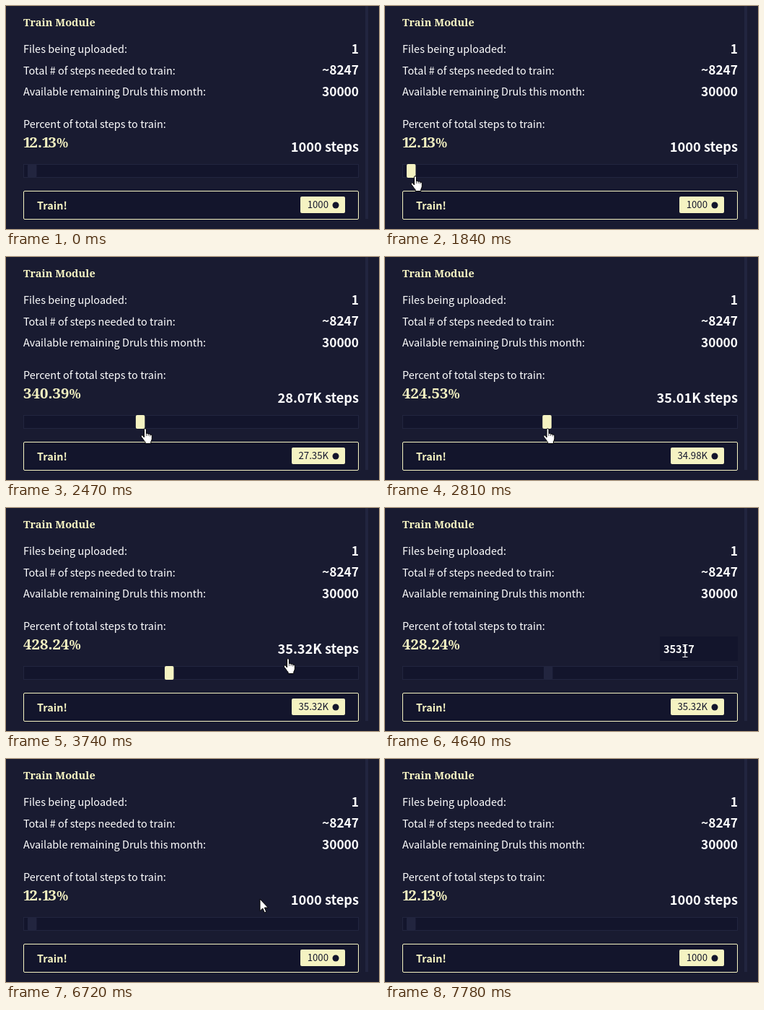
An HTML page that plays this animation: 517x309 px, repeating every 8.15 s.

```html
<!DOCTYPE html>
<html lang="en">
<head>
<meta charset="utf-8">
<title>Train Module</title>
<style>
  html, body { margin: 0; width: 100%; height: 100%; overflow: hidden; background: #191b31; }
  svg { display: block; width: 100vw; height: 100vh; }
  text { font-family: "Noto Sans CJK JP", "Noto Sans CJK SC", "Noto Sans CJK KR", "Noto Sans CJK", "Open Sans", sans-serif; font-size: 14.5px; fill: #fff; }
  .serif { font-family: "Noto Serif", serif; font-weight: 700; fill: #f5f3c2; }
  .bold { font-weight: 700; }
  .num { font-weight: 700; font-size: 17.3px; text-anchor: end; }
  .cursor { fill: #fff; stroke: #000; stroke-width: 1; stroke-linejoin: round; }
</style>
</head>
<body>
<svg viewBox="0 0 517 309">
  <rect width="517" height="309" fill="#191b31"/>
  <rect x="498" width="4" height="295" fill="#22253f"/>

  <text class="serif" x="24" y="28" style="font-size:14.6px">Train Module</text>
  <text x="24" y="65">Files being uploaded:</text>
  <text x="24" y="94.5">Total # of steps needed to train:</text>
  <text x="24" y="124">Available remaining Druls this month:</text>
  <text x="24" y="168.5">Percent of total steps to train:</text>
  <text class="num" x="489" y="66">1</text>
  <text class="num" x="489" y="95.3">~8247</text>
  <text class="num" x="489" y="124.5">30000</text>

  <text class="serif" x="24" y="196" style="font-size:20.5px"><tspan id="percent"></tspan><tspan style="font-size:18px">%</tspan></text>
  <text id="steps" class="num" x="489" y="202" style="font-size:18.2px"></text>

  <g id="field">
    <rect x="381" y="178" width="108" height="34" fill="#13152c"/>
    <rect id="mark" y="184" height="23" fill="#0a64d8"/>
    <text id="typed" class="bold" x="386" y="201"></text>
  </g>

  <rect x="24.5" y="219.5" width="464" height="18" fill="#13152c" stroke="#22253f"/>
  <rect id="thumb" y="219" width="12.5" height="19" rx="2"/>

  <rect x="24.5" y="256.5" width="464" height="39" rx="1.5" fill="#13152c" stroke="#f5f3c2"/>
  <text class="bold" x="43" y="281.5" style="fill:#f5f3c2">Train!</text>
  <rect id="badge" y="264" height="23" rx="2" fill="#f5f3c2"/>
  <text id="cost" x="447" y="280.3" text-anchor="end" style="font-size:13.2px;fill:#13152c"></text>
  <circle cx="457" cy="276" r="4.5" fill="#13152c"/>

  <g id="cursor">
    <path id="arrow" class="cursor" d="M0 0V16.5L3.8 13L6.3 18.8L8.8 17.7L6.3 12H11.3Z"/>
    <g id="hand" transform="translate(-5.5 0)">
      <path class="cursor" d="M5 13V2.2Q5 .6 6.4 .6T7.9 2.2V7.5Q9.5 6.8 10.6 8.2Q12 7.6 13.2 9Q15.6 8.4 15.8 10.8V15Q15.6 17 14.3 19V21.5H6.6V19.5Q4.8 17.6 3.5 15.4L1 12.3Q.2 10.6 1.6 10.1T3.6 11Z"/>
      <path d="M7.9 7.5V11M10.6 8.2V11M13.2 9V11.5" stroke="#000" stroke-width=".7" fill="none"/>
    </g>
    <path id="beam" d="M-3.5 -8.5H3.5M0 -8.5V8.5M-3.5 8.5H3.5" stroke="#fff" fill="none"/>
  </g>
</svg>
<script>
const LOOP = 8150, TOTAL = 8247, PICKED = 35317, TICK = 100 / 3;
const DRAG = 1840, RELEASE = 4220, OPEN = 4250, CONFIRM = 6720;
const el = Object.fromEntries([...document.querySelectorAll('[id]')].map(e => [e.id, e]));

const dragTimes = [0, 9, 19, 31].map(n => DRAG + n * TICK);
const drag = values => dragTimes.map((t, i) => [t, values[i]]);
const stepKeys = drag([1000, 14850, 28072, PICKED]);
const costKeys = drag([1000, 12310, 27350, PICKED]);
const xKeys = [[560, -14], [640, 16], [890, 41], ...drag([41, 131, 192, 226]),
  [3470, 226], [3740, 390], [3910, 409], [4600, 409], [4740, 444], [4870, 444], [5150, 352],
  [7330, 352], [7560, 180], [7750, 12], [7785, -20]];
const yKeys = [[560, 247], [890, 235], [DRAG, 235], [2140, 237], [3470, 237], [3740, 208],
  [3910, 198], [4870, 198], [5150, 194], [7330, 194], [7750, 216]];
const typing = [[5790, 1], [5900, 10], [6090, 100], [6250, 1000]];

// Smooth monotone curve through [time, value] keys, held at both ends.
function track(keys, t) {
  const last = keys.length - 1;
  if (t <= keys[0][0]) return keys[0][1];
  if (t >= keys[last][0]) return keys[last][1];
  const slope = i => (keys[i + 1][1] - keys[i][1]) / (keys[i + 1][0] - keys[i][0]);
  const tangent = i => {
    if (i === 0 || i === last) return 0;
    const a = slope(i - 1), b = slope(i);
    return a * b > 0 ? 2 * a * b / (a + b) : 0;
  };
  const i = keys.findIndex(k => k[0] > t) - 1;
  const [t0, v0] = keys[i], [t1, v1] = keys[i + 1];
  const d = t1 - t0, u = (t - t0) / d, w = 1 - u;
  return w * w * ((1 + 2 * u) * v0 + u * d * tangent(i)) +
         u * u * ((3 - 2 * u) * v1 - w * d * tangent(i + 1));
}

const show = (e, on) => e.setAttribute('display', on ? 'inline' : 'none');
const short = n => n >= 10000 ? (n / 1000).toFixed(2) + 'K' : String(Math.round(n));
const setText = (e, s) => { if (e.textContent !== s) e.textContent = s; };

function setPercent(steps) {
  const s = (steps / TOTAL * 100).toFixed(2);
  setText(el.percent, s);
  // The figure 1 sits tighter than the others.
  const dx = [...s].map((c, i) => (c === '1' ? -0.5 : 0) - (s[i - 1] === '1' ? 2.5 : 0));
  el.percent.setAttribute('dx', dx.join(' '));
}

function setThumb(steps, t) {
  el.thumb.setAttribute('x', 30 + (steps - 1000) * 0.005536);
  const fade = t < 1390 ? 1 : Math.min(1, Math.max(0, (t - RELEASE) / 120));
  const mix = (a, b) => Math.round(a + (b - a) * fade);
  el.thumb.setAttribute('fill', `rgb(${mix(245, 34)},${mix(243, 37)},${mix(194, 63)})`);
}

function setField(value, t, x) {
  const editing = t >= OPEN && t < CONFIRM;
  show(el.field, editing);
  show(el.steps, !editing);
  if (!editing) return;
  setText(el.typed, String(value));
  const selecting = t >= 4870 && t < typing[0][0];
  show(el.mark, selecting);
  if (selecting) {
    const digit = el.typed.getComputedTextLength() / 5;
    const from = Math.min(5, Math.max(0, Math.round((x - 386) / digit)));
    el.mark.setAttribute('x', 386 + from * digit);
    el.mark.setAttribute('width', (5 - from) * digit);
  }
}

function setCursor(x, y, t) {
  const kind = t < OPEN ? (x > 24 && y < 238.9 ? 'hand' : 'arrow')
             : t < 5200 && x > 381 ? 'beam' : 'arrow';
  for (const k of ['arrow', 'hand', 'beam']) show(el[k], k === kind);
  el.cursor.setAttribute('transform', `translate(${x.toFixed(1)} ${y.toFixed(1)})`);
}

function draw(t) {
  const q = DRAG + Math.floor((t - DRAG + 5) / TICK) * TICK;
  const entry = typing.filter(k => t >= k[0]).pop();
  const steps = entry ? entry[1] : Math.round(track(stepKeys, q));
  const cost = t >= CONFIRM ? 1000 : track(costKeys, q);
  const x = track(xKeys, q), y = track(yKeys, q);

  setPercent(steps);
  setText(el.steps, short(steps) + ' steps');
  setThumb(steps, t);
  setField(steps, t, x);

  const label = short(cost), width = label.length > 4 ? 74 : 62;
  setText(el.cost, label);
  el.badge.setAttribute('x', 470 - width);
  el.badge.setAttribute('width', width);
  setCursor(x, y, t);
}

const start = performance.now();
function loop() {
  draw((performance.now() - start) % LOOP);
  requestAnimationFrame(loop);
}
loop();
</script>
</body>
</html>
```
